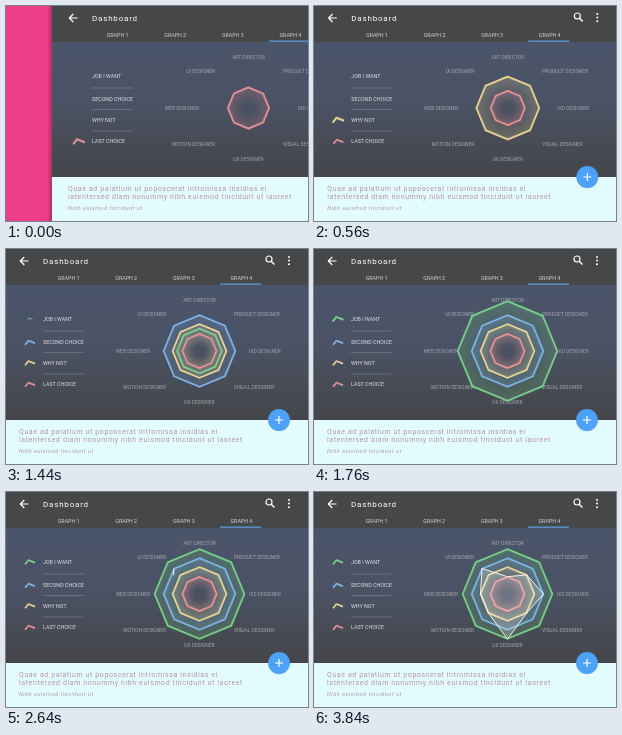
An HTML page for the animation above (3920 ms loop, 302 by 215 pixels).

```html
<!DOCTYPE html>
<html lang="en">
<head>
<meta charset="utf-8">
<title>Dashboard</title>
<style>
html, body { margin: 0; width: 100%; height: 100%; overflow: hidden; background: #ec3f88; }
svg { display: block; width: 302px; height: 215px; font-family: Roboto, Arial, sans-serif; }
</style>
</head>
<body>
<svg viewBox="0 0 302 215">
  <defs>
    <linearGradient id="body" x2="0" y2="1">
      <stop offset="0" stop-color="#4b556a"/>
      <stop offset=".45" stop-color="#4a5264"/>
      <stop offset="1" stop-color="#454649"/>
    </linearGradient>
    <linearGradient id="shade">
      <stop offset="0" stop-color="#601030" stop-opacity="0"/>
      <stop offset="1" stop-color="#601030" stop-opacity=".4"/>
    </linearGradient>
  </defs>
  <rect width="302" height="215" fill="#ec3f88"/>
  <g id="panel"></g>
</svg>
<script>
const LOOP = 3920, CX = 193.5, CY = 102;
const panel = document.getElementById('panel');

const rect = (x, y, w, h, fill) => `<rect x="${x}" y="${y}" width="${w}" height="${h}" fill="${fill}"/>`;
const text = (x, y, size, fill, str, extra = '') =>
  `<text x="${x}" y="${y}" font-size="${size}" fill="${fill}" ${extra}>${str}</text>`;
const line = (d, color, width, extra = '') =>
  `<path d="${d}" fill="none" stroke="${color}" stroke-width="${width}" ${extra}/>`;

// Corner k of an octagon, clockwise from the top
const corner = (k, r) => {
  const a = k * Math.PI / 4;
  return [r * Math.sin(a), -r * Math.cos(a)];
};
const path = points => 'M' + points.map(p => p.map(n => n.toFixed(2))).join('L');
const octagon = r => path([0, 1, 2, 3, 4, 5, 6, 7].map(k => corner(k, r))) + 'Z';

const choices = [
  { name: 'JOB I WANT', y: 69.5, r: 45, color: '#6bd07e', start: 1388 },
  { name: 'SECOND CHOICE', y: 93, r: 36, color: '#74afe9', start: 848 },
  { name: 'WHY NOT', y: 113.5, r: 27, color: '#ead288', start: 238 },
  { name: 'LAST CHOICE', y: 135, r: 17.3, color: '#ec868d', start: -260 }
];

const roles = [
  ['ART DIRECTOR', CX, 51, 'middle'], ['PRODUCT DESIGNER', 228, 65, 'start'],
  ['IXD DESIGNER', 243, 102, 'start'], ['VISUAL DESIGNER', 228, 138, 'start'],
  ['UX DESIGNER', CX, 153, 'middle'], ['MOTION DESIGNER', 160, 138, 'end'],
  ['WEB DESIGNER', 144, 102, 'end'], ['UI DESIGNER', 160, 65, 'end']
];

// Radius of the white outline at each corner, counterclockwise from the upper left
const scores = [36, 27, 27, 45, 27, 36, 27, 17.3, 36];
const outline = scores.map((r, i) => corner(7 - i, r));

// The first part of the outline, up to a fraction of its sides
function partOutline(part) {
  const sides = Math.min(part, 1) * (outline.length - 1);
  const full = Math.floor(sides);
  const points = outline.slice(0, full + 1);
  if (full < sides) {
    const [from, to] = outline.slice(full);
    points.push(from.map((n, i) => n + (to[i] - n) * (sides - full)));
  }
  return path(points);
}

const glow = (c, i) => `<radialGradient id="glow${i}">
  <stop offset=".25" stop-color="${c.color}" stop-opacity="0"/>
  <stop offset="1" stop-color="${c.color}" stop-opacity=".24"/></radialGradient>`;

panel.innerHTML =
  choices.map(glow).join('') +
  rect(-8, 0, 5, 215, 'url(#shade)') +
  `<g transform="translate(302) scale(-1 1)">${rect(-5, 0, 5, 215, 'url(#shade)')}</g>` +
  rect(-3, 0, 305, 36, '#464749') +
  rect(-3, 36, 305, 135, 'url(#body)') +
  rect(-3, 171, 305, 44, '#e3fcff') +
  // Header
  line('M22.5 12H14.5M18.3 8L14.3 12L18.3 16', '#fff', 1.2) +
  text(37, 14.6, 8, '#fff', 'Dashboard', 'letter-spacing=".8"') +
  `<circle cx="263" cy="10" r="3" fill="none" stroke="#fff" stroke-width="1.2"/>` +
  line('M265.2 12.2L268.4 15.4', '#fff', 1.4) +
  [8, 11.6, 15.2].map(y => `<circle cx="283" cy="${y}" r="1" fill="#fff"/>`).join('') +
  [1, 2, 3, 4].map(n =>
    text(5 + 57.6 * n, 31, 5.3, '#d5d6d9', 'GRAPH ' + n, 'text-anchor="middle"')).join('') +
  rect(214, 34.5, 41, 1.3, '#5b9bd8') +
  // List
  choices.map(c => text(37, c.y + 2.2, 5.35, '#dfe1e5', c.name)).join('') +
  [82, 103.5, 125].map(y => rect(37, y - .4, 40.5, .8, '#717988')).join('') +
  choices.map(c => `<g class="icon">${
    line('M-5 2.4L-1.6 -2L5 .6', c.color, 1.5, 'stroke-linejoin="round"')}${
    line('M-4.4 2.6L-1.2 -1L4.6 1.4', '#fff', .5, 'opacity=".6"')}</g>`).join('') +
  // Chart
  roles.map(([name, x, y, anchor]) =>
    text(x, y + 1.8, 4.9, '#a4a7af', name, `text-anchor="${anchor}"`)).join('') +
  `<g transform="translate(${CX} ${CY})">` +
  choices.map((c, i) => `<g class="ring"><path d="${octagon(c.r)}" fill="url(#glow${i})"
    stroke="${c.color}"/>${line(octagon(c.r - .8), '#fff', .4, 'opacity=".5"')}</g>`).join('') +
  `<path id="trace" fill="#fff" fill-opacity=".2" stroke="#f6f4ee" stroke-width="1"/></g>` +
  // Card
  text(13, 184.5, 7, '#b3969f', 'Quae ad palatium ut poposcerat intromissa insidias ei', 'letter-spacing=".6"') +
  text(13, 193.3, 7, '#b3969f', 'latentersed diam nonummy nibh euismod tincidunt ut laoreet', 'letter-spacing=".6"') +
  text(13, 204, 5.5, '#b3969f', 'Nibh euismod tincidunt ut', 'font-style="italic" letter-spacing=".55"') +
  // Round button
  `<circle cx="273" cy="171.5" r="11" fill="#000" opacity=".12"/>
   <circle cx="273" cy="171" r="10.9" fill="#4ca2f8"/>` +
  line('M269 171H277M273 167V175', '#fff', 1.2);

const rings = panel.querySelectorAll('.ring');
const icons = panel.querySelectorAll('.icon');
const trace = document.getElementById('trace');

// Grows past full size, then settles
function pop(t) {
  const v = Math.min(1, Math.max(0, t / 500)) - 1;
  return Math.max(0, 1 + 3.6 * v ** 3 + 2.6 * v ** 2);
}

// 80 ms steps; later on, every fifth step is held
function stepTime(ms) {
  const t = Math.floor(ms % LOOP / 80) * 80;
  return t > 640 && t % 400 === 320 ? t - 80 : t;
}

function draw(now) {
  const t = stepTime(now);
  const shift = t < 600 ? 49 * Math.exp(-t / 170) * Math.cos(Math.PI * t / 360) : 0;
  panel.setAttribute('transform', `translate(${shift.toFixed(2)})`);
  choices.forEach((c, i) => {
    const s = pop(t - c.start);
    rings[i].setAttribute('transform', `scale(${s})`);
    icons[i].setAttribute('transform', `translate(24 ${c.y + .4}) scale(${s})`);
    // Keep line weight while a ring grows
    rings[i].firstChild.setAttribute('stroke-width', 1.6 / Math.max(s, .1));
  });
  const drawn = Math.max(0, (t - 2400) / 1440) ** 1.9;
  trace.style.display = drawn ? '' : 'none';
  trace.setAttribute('d', partOutline(drawn));
}

const begin = performance.now();
function tick() {
  draw(performance.now() - begin);
  requestAnimationFrame(tick);
}
tick();
</script>
</body>
</html>
```
